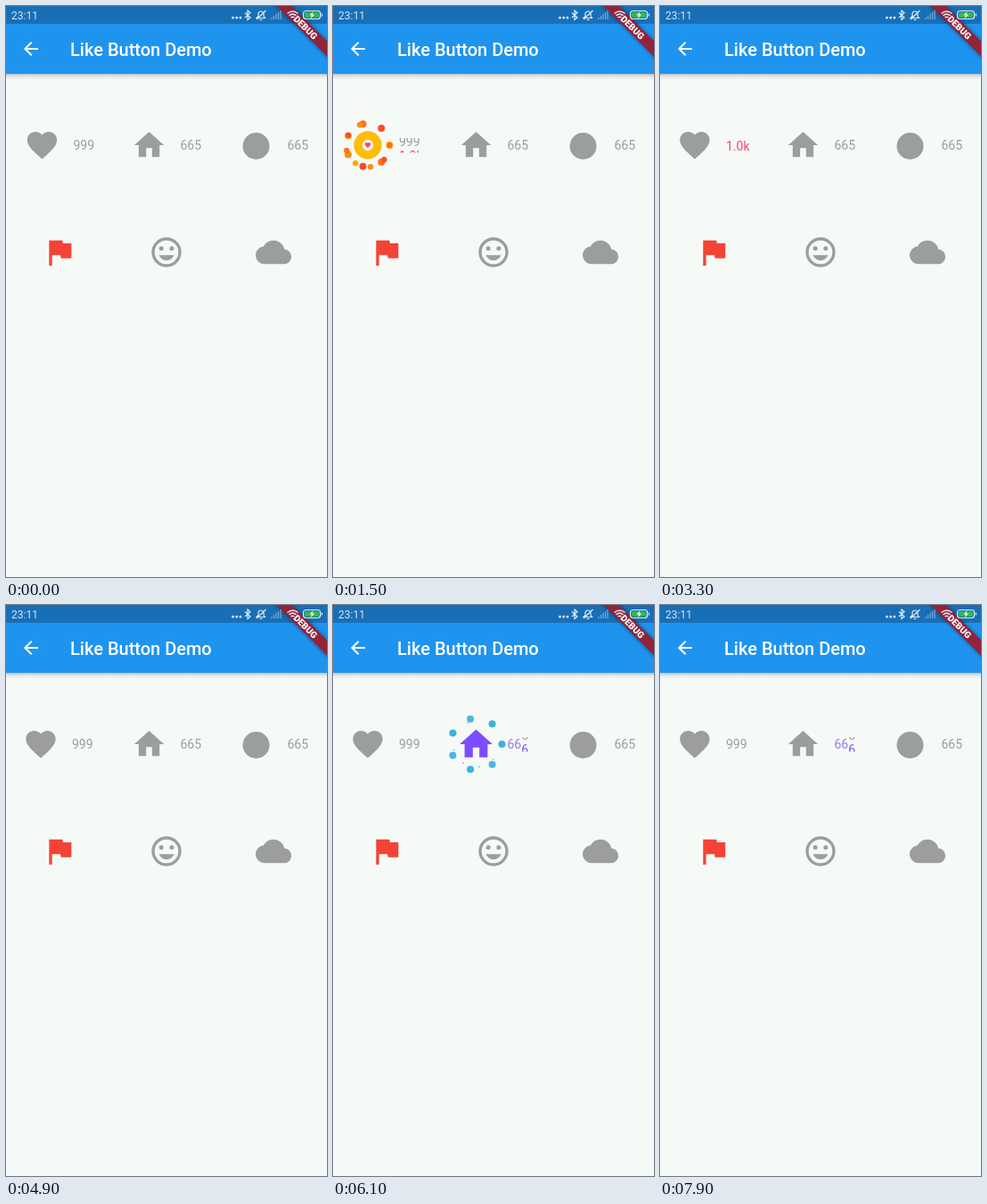
An HTML page for the animation above (8000 ms loop, 360 px wide and 640 px high).

```html
<!DOCTYPE html>
<html lang="en">
<head>
<meta charset="utf-8">
<title>Like Button Demo</title>
<style>
  html, body { margin: 0; width: 100%; height: 100%; overflow: hidden; background: #f6faf7; }
  svg { display: block; width: 360px; height: 640px; font-family: Roboto, sans-serif; }
  .count { font-size: 14px; }
</style>
</head>
<body>
<svg id="stage" viewBox="0 0 360 640">
  <defs>
    <linearGradient id="shade" x2="0" y2="1">
      <stop offset="0" stop-color="#000" stop-opacity=".24"/>
      <stop offset=".4" stop-color="#000" stop-opacity=".08"/>
      <stop offset="1" stop-color="#000" stop-opacity="0"/>
    </linearGradient>
    <clipPath id="line"><rect y="148" width="360" height="16.4"/></clipPath>
    <filter id="soft" x="-20%" y="-80%" width="140%" height="260%"><feGaussianBlur stdDeviation="2.5"/></filter>
  </defs>
  <rect width="360" height="640" fill="#f6faf7"/>
  <rect y="76" width="360" height="7" fill="url(#shade)"/>
  <rect width="360" height="76" fill="#1f94ef"/>
  <rect width="360" height="20" fill="#196fb6"/>
  <path transform="translate(16 36)" fill="#fff" d="M20 11H7.83l5.59-5.59L12 4l-8 8 8 8 1.41-1.41L7.83 13H20v-2z"/>
  <text x="72" y="56" font-size="20" font-weight="500" fill="#fff">Like Button Demo</text>

  <!-- debug ribbon -->
  <g transform="translate(360 0) rotate(45)">
    <rect x="-44" y="28" width="88" height="12" opacity=".45" filter="url(#soft)"/>
    <rect x="-44" y="28" width="88" height="12" fill="#91233a"/>
    <text y="37.7" font-size="10.2" font-weight="900" text-anchor="middle" fill="#fff">DEBUG</text>
  </g>

  <!-- status bar -->
  <g fill="none" stroke="#dcebf7" stroke-width="1.2">
    <text x="6" y="15" font-size="12" fill="#d5e6f4" stroke="none">23:11</text>
    <path d="M254.500 13.200h.01m4.200 0h.01m4.200 0h.01" stroke-width="2.800" stroke-linecap="round"/>
    <path d="M268 7.500l6 5.500-3 2.500V5l3 2.500-6 5.500"/>
    <path d="M281 13.500h9.500l-1.500-2V9a3 3 0 0 0-6 0v2.500zM284.500 15.500h3M281 15L291.500 5"/>
    <path d="M298 15v-2m2.500 2v-4m2.500 4V9m2.500 6V7m2.500 8V5" stroke="#6fa6d3" stroke-width="1.300"/>
    <path d="M315.500 8.500q6-5 12 0M317.500 10.800q4-3.300 8 0M319.500 13q2-1.600 4 0" stroke-width="1.500"/>
    <rect x="333.500" y="5.500" width="19" height="9" rx="3"/>
    <rect x="335" y="7" width="16" height="6" rx="1.800" fill="#35b948" stroke="none"/>
    <path d="M344.500 6l-4 4.500h2.500l-1.500 4 4.500-5h-2.700z" fill="#fff" stroke="none"/>
    <path d="M354.300 8.500v3"/>
  </g>

  <g fill="#9b9e9b">
    <circle cx="280.500" cy="157" r="15"/>
    <text class="count" x="315.500" y="161">665</text>
    <path transform="translate(40 256) scale(1.6667)" fill="#f44336" d="M14.400 6L14 4H5v17h2v-7h5.600l.4 2h7V6z"/>
    <g transform="translate(160 256) scale(1.6667)">
      <circle cx="12" cy="12" r="9" fill="none" stroke="#9b9e9b" stroke-width="2"/>
      <circle cx="8.500" cy="9.500" r="1.500"/><circle cx="15.500" cy="9.500" r="1.500"/>
      <path d="M12 17.500c2.330 0 4.310-1.460 5.110-3.500H6.890c.8 2.040 2.780 3.500 5.110 3.500z"/>
    </g>
    <path transform="translate(280 256) scale(1.6667)" d="M19.350 10.040C18.670 6.590 15.640 4 12 4 9.110 4 6.600 5.640 5.350 8.040 2.340 8.360 0 10.910 0 14c0 3.310 2.690 6 6 6h13c2.760 0 5-2.240 5-5 0-2.640-2.050-4.780-4.650-4.960z"/>
  </g>
</svg>
<script>
const LOOP = 8000, STEP = 100;
const GREY = '#9b9e9b', LINE = 16.4;
const LIKE_MS = 1960, COUNT_DELAY = 145, COUNT_MS = 1300;
const DOTS = 7, ANGLE = 360 / DOTS;
const stage = document.getElementById('stage');

const clamp = v => Math.min(1, Math.max(0, v));
const span = (v, a, b) => clamp((v - a) / (b - a));
const mix = (a, b, k) => a + (b - a) * k;
const rgb = hex => [1, 3, 5].map(i => parseInt(hex.slice(i, i + 2), 16));
const blend = (a, b, k) => {
  const to = rgb(b);
  return `rgb(${rgb(a).map((v, i) => Math.round(mix(v, to[i], k)))})`;
};
const overshoot = k => (k -= 1, k * k * (3.5 * k + 2.5) + 1);
const decelerate = k => 1 - (1 - k) ** 2;

// cubic-bezier(.25, .1, .25, 1)
function ease(x) {
  const bez = (s, a, b) => 3 * s * (1 - s) ** 2 * a + 3 * s * s * (1 - s) * b + s ** 3;
  let lo = 0, hi = 1;
  for (let i = 0; i < 20; i++) {
    const mid = (lo + hi) / 2;
    if (bez(mid, .25, .25) < x) lo = mid; else hi = mid;
  }
  return bez(lo, .1, 1);
}

function set(node, attrs) {
  for (const key in attrs) node.setAttribute(key, attrs[key]);
  return node;
}

function add(parent, tag, attrs = {}) {
  return parent.appendChild(set(document.createElementNS('http://www.w3.org/2000/svg', tag), attrs));
}

function likeButton(o) {
  const root = add(stage, 'g');
  const burst = add(root, 'g', { transform: `translate(${o.x} 156)` });
  const dots = Array.from({ length: DOTS * 2 }, () => add(burst, 'circle'));
  const ring = add(burst, 'circle', { fill: 'none' });
  const icon = add(burst, 'path', { d: o.icon });
  const box = add(root, 'g', { 'clip-path': 'url(#line)', class: 'count' });
  const label = (text, x, fill) => {
    const node = add(box, 'text', { x, y: 161, fill });
    node.textContent = text;
    return node;
  };
  const restX = o.textX + o.same.length * 7.86;
  const sameOff = label(o.same, o.textX, GREY), sameOn = label(o.same, o.textX, o.color);
  const off = label(o.off, restX, GREY), on = label(o.on, restX, o.color);

  function drawDots(p) {
    const c = o.dots, late = p >= .5 ? 1 : 0;
    const k = late ? span(p, .5, 1) : span(p, 0, .5);
    const paint = i => blend(c[(i + late) % 4], c[(i + late + 1) % 4], k);
    const near = 25.6 * span(p, 0, .3);
    const far = p < .3 ? near : mix(25.6, 32, span(p, .3, 1));
    const farSize = 4 * (1 - span(p, .7, 1));
    const nearSize = p < .5 ? mix(4, 1.2, span(p, .2, .5)) : mix(1.2, 0, span(p, .5, 1));
    dots.forEach((dot, n) => {
      const i = n % DOTS, inner = n >= DOTS;
      const a = i * (inner ? ANGLE - 10 : ANGLE) * Math.PI / 180;
      const r = inner ? near : far;
      set(dot, {
        cx: r * Math.cos(a), cy: r * Math.sin(a),
        r: p > 0 ? (inner ? nearSize : farSize) : 0,
        fill: paint(inner ? i + 1 : i), opacity: 1 - span(p, .6, 1)
      });
    });
  }

  function drawRing(p, busy) {
    const outer = mix(.1, 1, ease(span(p, 0, .3)));
    const inner = mix(.2, 1, ease(span(p, .2, .5)));
    const far = outer * 16, near = inner * 16 + 1;
    const shown = busy && far > near;
    set(ring, {
      r: shown ? (far + near) / 2 : 0,
      'stroke-width': shown ? far - near : 0,
      stroke: blend(o.ring[0], o.ring[1], span(outer, .5, 1))
    });
  }

  return t => {
    const p = clamp((t - o.like) / LIKE_MS);
    const busy = p > 0 && p < 1;
    const liked = t >= o.like && t < o.unlike;
    const size = busy ? mix(.2, 1, overshoot(span(p, .35, .7))) : 1;
    drawDots(span(p, .1, 1) && decelerate(span(p, .1, 1)));
    drawRing(p, busy);
    set(icon, { transform: `scale(${size * 5 / 3}) translate(-12 -12)`, fill: liked ? o.color : GREY });

    const roll = start => clamp((t - start - COUNT_DELAY) / COUNT_MS);
    const k = roll(o.like) - roll(o.unlike);
    set(off, { y: 161 - k * LINE });
    set(on, { y: 161 + (1 - k) * LINE });
    set(sameOff, { opacity: 1 - k });
    set(sameOn, { opacity: k });
    // the wider count nudges the centred row to the left
    set(root, { transform: `translate(${t < o.like + COUNT_DELAY ? o.nudge : 0} 0)` });
  };
}

const buttons = [
  likeButton({
    x: 39, textX: 74, nudge: 1.5, like: 1030, unlike: 3075,
    same: '', off: '999', on: '1.0k', color: '#ff4078',
    ring: ['#ff5722', '#ffc107'],
    dots: ['#ffc107', '#ff9800', '#ff5722', '#f44336'],
    icon: 'M12 21.35l-1.45-1.32C5.4 15.36 2 12.28 2 8.5 2 5.42 4.42 3 7.5 3c1.74 0 3.41.81 4.5 2.09C13.09 3.81 14.76 3 16.5 3 19.58 3 22 5.42 22 8.5c0 3.78-3.4 6.86-8.55 11.54L12 21.35z'
  }),
  likeButton({
    x: 160.5, textX: 195.5, nudge: 0, like: 5150, unlike: 7260,
    same: '66', off: '5', on: '6', color: '#7c4dff',
    ring: ['#00ddff', '#0099cc'],
    dots: ['#33b5e5', '#0099cc', '#33b5e5', '#0099cc'],
    icon: 'M10 20v-6h4v6h5v-8h3L12 3 2 12h3v8z'
  })
];

const begin = performance.now();
function frame() {
  const t = (performance.now() - begin) % LOOP;
  const held = Math.floor(t / STEP) * STEP;
  buttons.forEach(draw => draw(held));
  requestAnimationFrame(frame);
}
frame();
</script>
</body>
</html>
```
